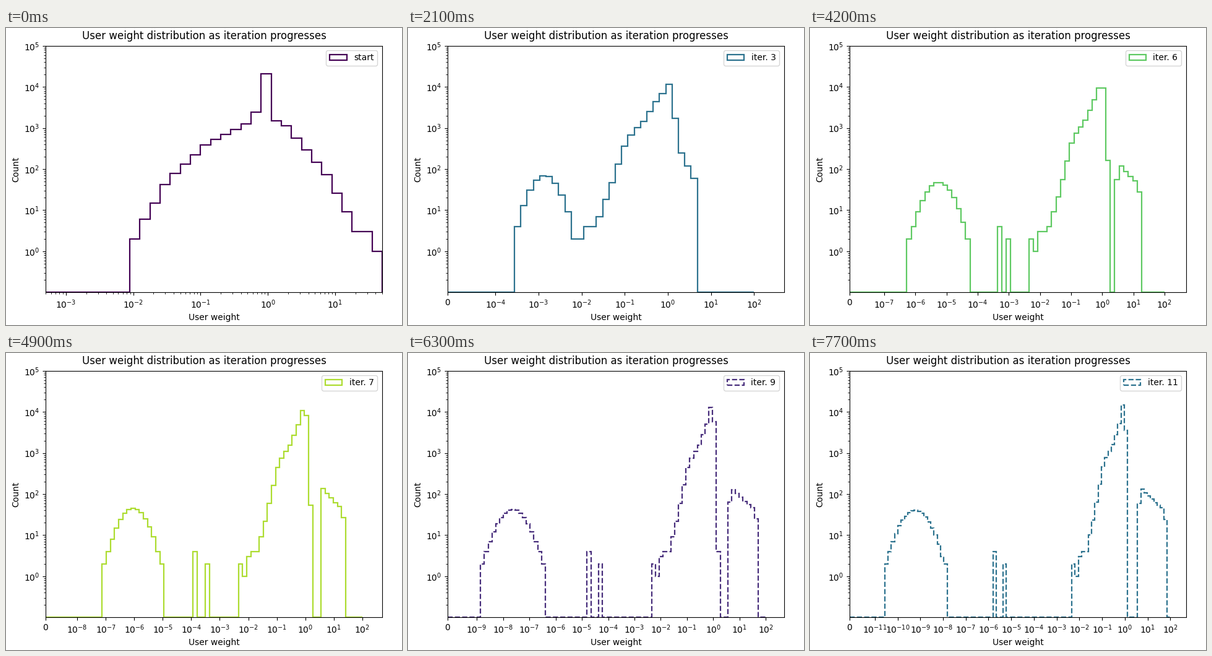
A matplotlib script that plays this animation: 640x480 px, repeating every 8 s.

```python
import matplotlib.pyplot as plt
import numpy as np
from matplotlib.animation import FuncAnimation
from matplotlib.patches import Patch, Polygon
from matplotlib.ticker import FuncFormatter, LogLocator, NullLocator

FLOOR = 0.1
LINE = 1.6
EMPTY = -9.0
TICK_MS, STEP_TICKS, TICKS = 100, 7, 80

# Key points: log10 of the weight against log10 of the count.
START_X = [-1.975, -1.5, -0.9, -0.33, -0.175, -0.025, 0.125, 0.275, 0.88,
           1.33, 1.48, 1.63]
START_Y = [0.3, 1.7, 2.62, 3.09, 3.38, 4.32, 3.18, 3.05, 1.86, 0.48, 0.48, 0]
RISE_X = [-2.35, -2.12, -1.97, -1.68, -1.4, -1.25, -0.97, -0.83, -0.53, -0.25]
RISE_Y = [0.5, 0, 0.5, 0.6, 1.35, 1.8, 2.65, 2.87, 3.2, 3.68]


def low_edge(n):
    return -0.98 - 0.875 * n


def low_hump(x, n):
    """Arch of fading users that drifts left and widens."""
    lo, hi = low_edge(n), 0.04 - 0.715 * n
    v = (2 * x - lo - hi) / (hi - lo)
    top = 1.51 + 1 / n
    return np.where(abs(v) < 1, 0.1 + (top - 0.1) * (1 - v ** 2), EMPTY)


def main_peak(x, n):
    """Fixed rising side; the falling side steepens."""
    fall = [3.75 + 0.04 * n, 4.15 - 0.005 * n ** 2, 3.5 - 0.036 * n ** 2]
    y = np.interp(x, RISE_X + [-0.1, 0.05, 0.18], RISE_Y + fall, left=EMPTY)
    return np.where(x < 0.25, y, EMPTY)


def heavy_users(x, n):
    """Shelf that breaks away to the right."""
    lo = np.interp(n, [3, 8], [0.25, 0.55])
    hi = np.interp(n, [1, 6, 10], [0.35, 1.27, 1.86])
    u = (x - lo) / (hi - lo)
    y = np.interp(u, [0, 0.12, 0.6, 0.85, 1], [1.4, 2.15, 1.8, 1.65, 1.2])
    y += max(0, 0.1 * (6 - n)) * (1 - u)
    return np.where((u > 0) & (u < 1), y, EMPTY)


def outlier(x, pos, count):
    return np.where(abs(x - pos) <= (x[1] - x[0]) / 2, np.log10(count), EMPTY)


def histogram(n):
    """Bin edges and counts after n iterations."""
    if n == 0:
        logs = -2.05 + 0.15 * np.arange(26)
    else:
        exp = int(np.ceil(-low_edge(n)))
        logs = np.linspace(-exp, 2, 7 * (exp + 2))
    x = (logs[1:] + logs[:-1]) / 2
    if n == 0:
        y = np.interp(x, START_X, START_Y)
    else:
        y = np.max([low_hump(x, n), main_peak(x, n), heavy_users(x, n),
                    outlier(x, -0.4 - 0.488 * n, 4),
                    outlier(x, -0.12 - 0.472 * n, 2)], axis=0)
    counts = np.where(y >= 0, np.round(10 ** y), 0)
    first = 1e-4 if n == 0 else 0
    return np.r_[first, 10 ** logs], np.r_[0, counts]


def outline(edges, counts):
    heights = np.r_[FLOOR, np.repeat(np.maximum(counts, FLOOR), 2), FLOOR]
    return np.column_stack([np.repeat(edges, 2), heights])


def power_label(x, _):
    if x == 0:
        return r"$\mathdefault{0}$"
    return r"$\mathdefault{10^{%d}}$" % round(np.log10(x))


def scale_x(n):
    if n == 0:
        ax.set_xscale("log")
        ax.set_xlim(5e-4, 50)
        return
    exp = int(np.ceil(-low_edge(n)))
    ax.set_xscale("symlog", linthresh=10.0 ** -exp)
    ax.set_xlim(0, 500)
    ax.set_xticks(np.r_[0, 10.0 ** np.arange(-exp, 3)])
    ax.xaxis.set_minor_locator(NullLocator())
    ax.xaxis.set_major_formatter(FuncFormatter(power_label))


fig, ax = plt.subplots(figsize=(6.4, 4.8), dpi=100)
fig.subplots_adjust(left=0.1, right=0.95, bottom=0.11, top=0.94)
fig.suptitle("User weight distribution as iteration progresses", y=0.9925)
ax.set_xlabel("User weight")
ax.set_ylabel("Count")
ax.set_yscale("log")
ax.set_ylim(FLOOR, 1e5)
ax.set_yticks(10.0 ** np.arange(6))
ax.yaxis.set_major_formatter(FuncFormatter(power_label))
ax.yaxis.set_minor_locator(LogLocator(subs=np.arange(2, 10), numticks=99))
ax.yaxis.set_minor_formatter(FuncFormatter(lambda x, _: ""))
steps = Polygon([(1, 1), (2, 1)], closed=False, fill=False, lw=LINE)
ax.add_patch(steps)


def draw(tick):
    n = tick // STEP_TICKS
    scale_x(n)
    style = dict(edgecolor=plt.cm.viridis(n % 8 / 8),
                 linestyle="solid" if n < 8 else "dashed")
    steps.set_xy(outline(*histogram(n)))
    steps.set(**style)
    label = f"iter. {n}" if n else "start"
    ax.legend(handles=[Patch(fill=False, lw=LINE, label=label, **style)],
              loc="upper right", bbox_to_anchor=(0.998, 1))
    return [steps]


anim = FuncAnimation(fig, draw, frames=TICKS, interval=TICK_MS,
                     init_func=lambda: [steps], repeat=True, repeat_delay=0)
plt.show()
```
